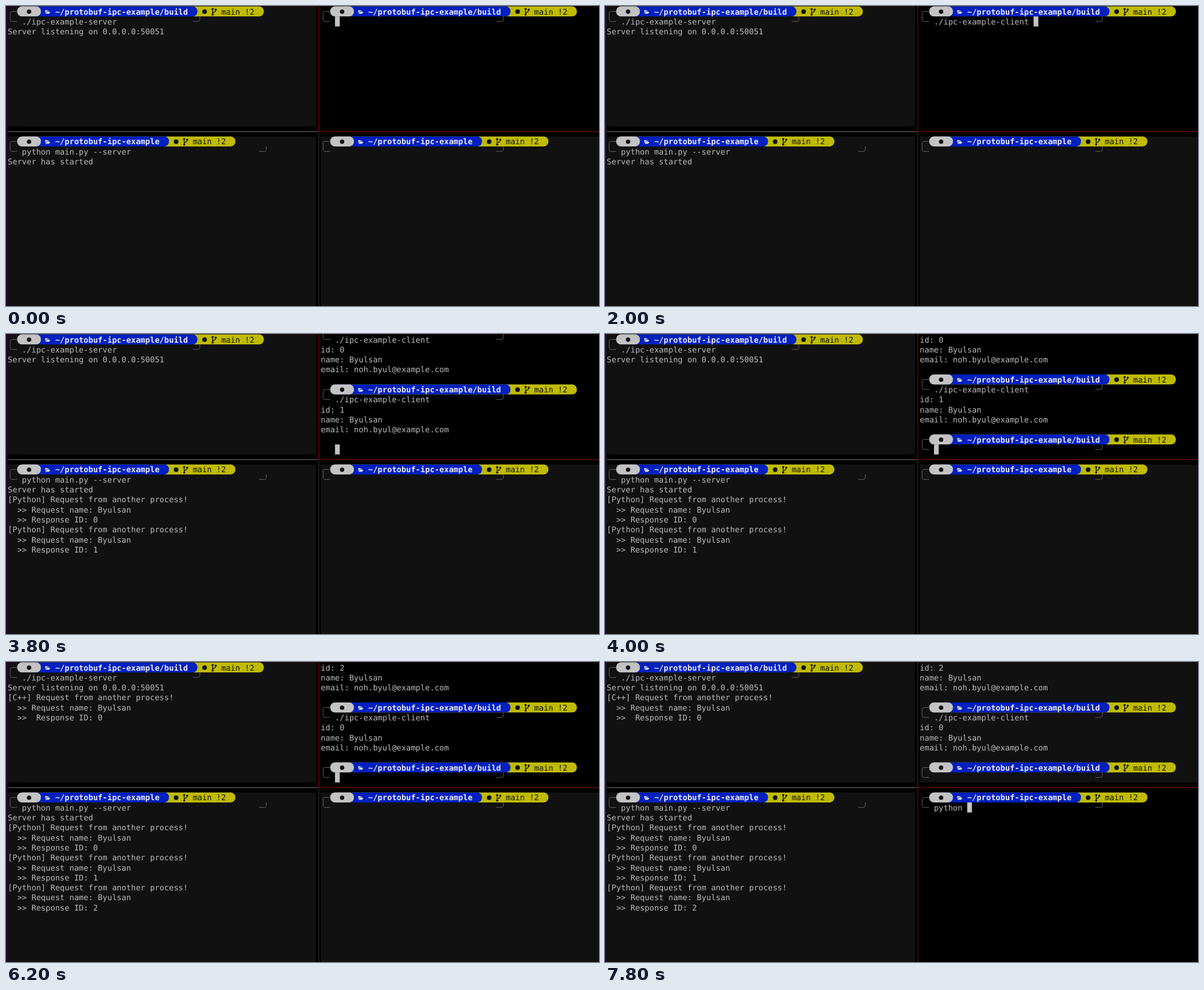
An HTML page with a canvas for the animation above (8000 ms loop, 1024 by 519 pixels).

```html
<!DOCTYPE html>
<html lang="en">
<head>
<meta charset="utf-8">
<title>Terminal panes</title>
<style>
html, body { margin: 0; width: 100%; height: 100%; overflow: hidden; background: #000; }
canvas { display: block; }
</style>
</head>
<body>
<canvas id="stage" width="1024" height="519"></canvas>
<script>
const ctx = document.getElementById('stage').getContext('2d');
const LOOP = 8000;
const W = 1024, H = 519;
const CW = 8.19, RH = 17.3, LEFT = 3, TOP = 0.8;
const FONT = '13.6px "DejaVu Sans Mono", "Noto Sans Mono", monospace';
const C = {
  text: '#bbbbbb', idle: '#111111', frame: '#626262', line: '#555555', dim: '#242424',
  red: '#6c0000', gray: '#c3c3c3', blue: '#0020c0', yellow: '#bfbb00', path: '#ececec',
  ink: '#101010', edge: '#300838', top: '#240a1c'
};
const NAME = 'Byulsan', MAIL = 'noh.byul@example.com';
const CMD = './ipc-example-client ';
const ROOT = '~/protobuf-ipc-example', BUILD = ROOT + '/build';

// [time, text at the prompt]
const TYPED = [
  [600, './'], [800, './ipc'], [1000, './ipc-example-'], [1200, './ipc-example-c'], [1400, CMD],
  [2200, ''], [3400, CMD], [3800, ''], [4400, CMD], [4600, ''], [5400, CMD], [5800, '']
];
const PYTHON = [[7200, 'p'], [7400, 'pyt'], [7600, 'python'], [7800, 'python ']];
const RUNS = [
  { at: 2200, id: 0 }, { at: 3800, id: 1 }, { at: 4600, id: 2 }, { at: 5800, id: 0, cpp: true }
];
const SCROLL_PAUSE = [3800, 4000];
const SWITCH = 6800;

const colX = c => LEFT + c * CW;
const rowY = r => TOP + r * RH;
const latest = (list, t) => list.reduce((s, [at, v]) => (t >= at ? v : s), '');

function rect(color, x, y, w, h) {
  ctx.fillStyle = color;
  ctx.fillRect(x, y, w, h);
}

function text(str, col, row, color = C.text, bold = false) {
  ctx.font = (bold ? 'bold ' : '') + FONT;
  ctx.fillStyle = color;
  [...str].forEach((ch, i) => {
    if (ch !== ' ') ctx.fillText(ch, colX(col + i), rowY(row) + 13.7);
  });
}

function dot(x, y, r, color) {
  ctx.fillStyle = color;
  ctx.beginPath();
  ctx.arc(x, y, r, 0, Math.PI * 2);
  ctx.fill();
}

function pill(col, end, row, color) {
  ctx.fillStyle = color;
  ctx.beginPath();
  ctx.roundRect(colX(col), rowY(row), (end - col) * CW, RH, 8.2);
  ctx.fill();
}

// Corner of a prompt bracket: from the row edge to a short horizontal stub
function corner(col, row, side, dir) {
  const x = colX(col + 0.5), y = rowY(row) + RH / 2;
  ctx.strokeStyle = C.frame;
  ctx.lineWidth = 1;
  ctx.beginPath();
  ctx.moveTo(x, y + dir * RH / 2);
  ctx.arcTo(x, y, x + side * 4, y, 3.5);
  ctx.lineTo(x + side * CW * 1.5, y);
  ctx.stroke();
}

function folder(x, y) {
  ctx.fillStyle = C.path;
  ctx.beginPath();
  ctx.moveTo(x - 4, y + 2);
  ctx.lineTo(x - 4, y - 3);
  ctx.lineTo(x - 1, y - 3);
  ctx.lineTo(x, y - 2);
  ctx.lineTo(x + 2.5, y - 2);
  ctx.lineTo(x + 2.5, y - 0.8);
  ctx.lineTo(x - 2, y - 0.8);
  ctx.fill();
  ctx.beginPath();
  ctx.moveTo(x - 1.6, y);
  ctx.lineTo(x + 4.6, y);
  ctx.lineTo(x + 2.8, y + 3.2);
  ctx.lineTo(x - 3.7, y + 3.2);
  ctx.fill();
}

function branch(x, y) {
  ctx.strokeStyle = C.ink;
  ctx.lineWidth = 1.3;
  ctx.beginPath();
  ctx.moveTo(x - 2.5, y - 4);
  ctx.lineTo(x - 2.5, y + 5);
  ctx.moveTo(x + 2.8, y - 3);
  ctx.quadraticCurveTo(x + 2.8, y + 0.5, x - 2.5, y + 2);
  ctx.stroke();
  dot(x - 2.5, y - 4.5, 1.8, C.ink);
  dot(x + 2.8, y - 3.5, 1.8, C.ink);
  dot(x - 2.5, y + 5, 1.8, C.ink);
}

function promptHead(col, row, path) {
  const end = col + path.length + 12, y = rowY(row) + RH / 2 + 0.4;
  corner(col, row, 1, 1);
  pill(col + 2, end + 14, row, C.yellow);
  pill(col + 2, end, row, C.blue);
  pill(col + 2, col + 7, row, C.gray);
  dot(colX(col + 4.5), y, 3.8, C.ink);
  folder(colX(col + 8.4), y + 0.3);
  text(path, col + 10, row, C.path, true);
  dot(colX(end + 1.5), y, 4, C.ink);
  branch(colX(end + 3.5), y);
  text('main !2', end + 5, row, C.ink);
}

function promptTail(col, row, cmd, right) {
  corner(col, row, 1, -1);
  corner(right, row, -1, -1);
  text(cmd, col + 3, row);
}

function cursor(col, row) {
  rect(C.gray, colX(col), rowY(row), CW, RH);
}

function report(lang, id, gap = ' ') {
  return [
    `[${lang}] Request from another process!`,
    `  >> Request name: ${NAME}`,
    `  >>${gap}Response ID: ${id}`
  ];
}

function server(row, path, cmd, right, lines) {
  promptHead(0, row, path);
  promptTail(0, row + 1, cmd, right);
  lines.forEach((s, i) => text(s, 0, row + 2 + i));
}

function client(t, done) {
  const col = 66, right = 104, rows = 12;
  const typed = latest(TYPED, t);
  const paused = t >= SCROLL_PAUSE[0] && t < SCROLL_PAUSE[1];
  const head = r => promptHead(col, r, BUILD);
  const tail = cmd => r => promptTail(col, r, cmd, right);
  const plain = s => r => text(s, col, r);
  const lines = [];
  for (const run of done) {
    lines.push(head, tail(CMD), plain(`id: ${run.id}`), plain(`name: ${NAME}`),
      plain(`email: ${MAIL}`), plain(''));
  }
  if (paused) lines.push(plain(''));
  else lines.push(head, tail(typed));
  const skip = Math.max(0, lines.length - rows);
  lines.slice(skip).forEach((draw, r) => draw(r));
  if (t < SWITCH) cursor(col + 3 + typed.length, lines.length - skip - 1);
}

function borders(lower) {
  const x = colX(65.5), y = rowY(12.5), w = 1.5;
  rect(lower ? C.dim : C.red, x, 0, w, y);
  rect(lower ? C.red : C.dim, x, y, w, H - y);
  rect(C.line, LEFT, y - 0.5, x - LEFT, w);
  rect(C.red, x, y - 0.5, W - x, w);
}

function draw(t) {
  const lower = t >= SWITCH;
  const midX = colX(66), bottom = rowY(13);
  rect('#000', 0, 0, W, H);
  rect(C.idle, LEFT, 1, colX(65) - LEFT, rowY(12) - 1);
  rect(C.idle, LEFT, bottom, colX(65) - LEFT, H - bottom);
  if (lower) rect(C.idle, midX, 1, W - midX, rowY(12) - 1);
  else rect(C.idle, midX, bottom, W - midX, H - bottom);
  rect(C.top, 0, 0, W, 1);
  rect(C.edge, 0, 0, 2.5, H);
  borders(lower);

  const done = RUNS.filter(r => t >= r.at);
  const cpp = done.filter(r => r.cpp).flatMap(r => report('C++', r.id, '  '));
  const py = done.filter(r => !r.cpp).flatMap(r => report('Python', r.id));
  server(0, BUILD, './ipc-example-server', 40, ['Server listening on 0.0.0.0:50051', ...cpp]);
  server(13, ROOT, 'python main.py --server', 54, ['Server has started', ...py]);
  client(t, done);

  const typed = latest(PYTHON, t);
  promptHead(66, 13, ROOT);
  promptTail(66, 14, typed, 104);
  if (lower) cursor(69 + typed.length, 14);
}

ctx.textRendering = 'geometricPrecision';
const start = performance.now();
function tick() {
  draw((performance.now() - start) % LOOP);
  requestAnimationFrame(tick);
}
tick();
</script>
</body>
</html>
```
